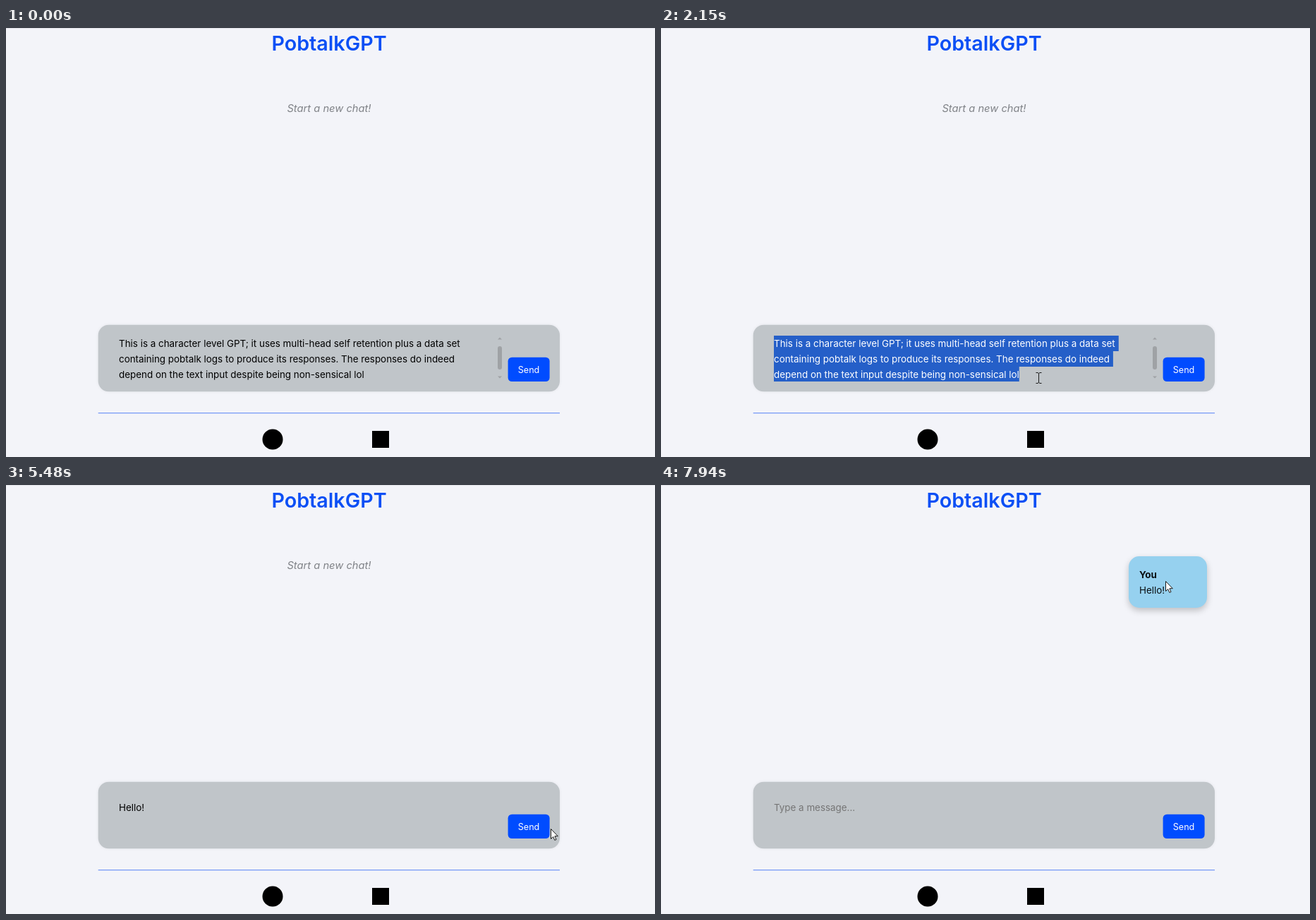
Animation, 920 px wide and 608 px high, one loop 8000 ms. Source, as an HTML page with a canvas:

```html
<!DOCTYPE html>
<html lang="en">
<head>
<meta charset="utf-8">
<title>PobtalkGPT</title>
<style>
  html, body { margin: 0; width: 100%; height: 100%; overflow: hidden; background: #f3f4f9; }
  canvas { display: block; width: 920px; height: 608px; }
</style>
</head>
<body>
<canvas id="stage" width="920" height="608"></canvas>
<script>
const ctx = document.getElementById('stage').getContext('2d');

const LOOP = 8000;
const ENTER = 190, FOCUS = 840, SELECT = 2150, CLEAR = 3280, TYPE = 3940, SEND = 5680, HOVER = 7400;
const KEY_GAP = 162, BLINK = 530;

const MESSAGE = 'Hello!';
const PARAGRAPH = [
  'This is a character level GPT; it uses multi-head self retention plus a data set',
  'containing pobtalk logs to produce its responses. The responses do indeed',
  'depend on the text input despite being non-sensical lol'
];
const BODY_SIZE = 13.4, LINE = 21.8, TEXT_X = 160;

const clamp01 = v => Math.max(0, Math.min(1, v));
const progress = (t, start, end) => clamp01((t - start) / (end - start));
const smooth = u => u * u * (3 - 2 * u);
const easeOut = u => 1 - (1 - u) ** 3;
const inside = (p, x0, y0, x1, y1) => p.x >= x0 && p.x <= x1 && p.y >= y0 && p.y <= y1;

function pointerAt(t) {
  const p = { x: 650, y: 545 };
  const glide = (start, end, x, y) => {
    const u = smooth(progress(t, start, end));
    p.x += (x - p.x) * u;
    p.y += (y - p.y) * u;
  };
  glide(ENTER, 560, 550, 474);      // into the text area and just below it
  glide(700, 940, 542, 502);
  glide(940, 1065, 468, 459);       // over the words and back
  glide(1210, 1950, 535, 496);
  glide(5080, 5350, 824, 491);      // past the button, then onto it
  glide(5350, 5560, 748, 485);
  glide(5890, 6440, 628, 294);      // up to the new message
  glide(6970, 7480, 732, 136);
  glide(7730, 7940, 715, 136);
  return p;
}

function setFont(size, style = '400') {
  ctx.font = `${style} ${size}px Inter, sans-serif`;
}

function text(str, x, y, size, color, style, align = 'left') {
  setFont(size, style);
  ctx.fillStyle = color;
  ctx.textAlign = align;
  ctx.fillText(str, x, y);
}

function widthOf(str) {
  setFont(BODY_SIZE);
  return ctx.measureText(str).width;
}

function box(x, y, w, h, r, color) {
  ctx.fillStyle = color;
  ctx.beginPath();
  ctx.roundRect(x, y, w, h, r);
  ctx.fill();
}

function withShadow(alpha, blur, dy, paint) {
  ctx.save();
  ctx.shadowColor = `rgba(0,0,0,${alpha})`;
  ctx.shadowBlur = blur;
  ctx.shadowOffsetY = dy;
  paint();
  ctx.restore();
}

function drawPage(hover) {
  box(0, 0, 920, 608, 0, '#f3f4f9');
  box(0, 0, 920, 1, 0, '#e3e5ea');
  text('PobtalkGPT', 458, 31.5, 28.7, '#0b4ff5', '600', 'center');
  withShadow(0.07, 4, 0, () => box(130.7, 420.7, 654.3, 94.6, 15, '#c0c5c9'));
  box(130.7, 545.2, 654.3, 1, 0, '#5580f6');
  box(711.6, 466.7, 59, 34.3, 5.5, hover ? '#2566ea' : '#004cff');
  text('Send', 741, 488.5, 12.6, '#fff', '400', 'center');
  box(363.5, 568.5, 29, 29, 14.5, '#000');
  box(519, 571, 24, 24, 0, '#000');
}

function drawScrollbar() {
  const gray = '#9fa2a5';
  box(697, 451, 6, 33, 3, gray);
  for (const dir of [-1, 1]) {
    const base = 467.5 + 26 * dir;
    ctx.beginPath();
    ctx.moveTo(697, base);
    ctx.lineTo(700, base + 3 * dir);
    ctx.lineTo(703, base);
    ctx.fill();
  }
}

function drawParagraph(selected) {
  PARAGRAPH.forEach((line, i) => {
    const last = i === PARAGRAPH.length - 1;
    if (selected) {
      box(TEXT_X, 436 + 22 * i, widthOf(line) + (last ? 0 : 5), last ? 21 : 22, 0, '#255fc8');
    }
    text(line, TEXT_X, 452.3 + LINE * i, BODY_SIZE, selected ? '#fff' : '#000');
  });
  drawScrollbar();
}

function drawCaret(t, since, content, y) {
  if (t >= since && (t - since) % (2 * BLINK) < BLINK) {
    box(Math.round(TEXT_X + widthOf(content)), y, 1.3, 19, 0, '#000');
  }
}

function drawInput(t) {
  if (t < CLEAR) {
    const selected = t >= SELECT;
    drawParagraph(selected);
    if (!selected) drawCaret(t, FOCUS, PARAGRAPH[2], 481);
    return;
  }
  const keys = Math.min(MESSAGE.length, Math.max(0, Math.floor((t - TYPE) / KEY_GAP) + 1));
  const typed = t < SEND ? MESSAGE.slice(0, keys) : '';
  text(typed || 'Type a message...', TEXT_X, 462, BODY_SIZE, typed ? '#000' : '#757575');
  const lastEdit = keys ? TYPE + (keys - 1) * KEY_GAP : CLEAR;
  if (t < SEND) drawCaret(t, lastEdit, typed, 447);
}

function drawChat(t) {
  if (t < SEND) {
    text('Start a new chat!', 458, 118.5, 14.7, '#808388', 'italic 400', 'center');
    return;
  }
  const scale = easeOut(progress(t, SEND, SEND + 220));
  const lift = progress(t, HOVER, HOVER + 250);
  ctx.save();
  ctx.translate(718.5, 137.5);
  ctx.scale(scale, scale);
  ctx.translate(-718.5, -137.5);
  withShadow(0.22 * lift, 10, 4, () => box(663, 101, 111, 73, 15, '#96d1ef'));
  text('You', 678, 131.5, BODY_SIZE, '#0a0f12', '700');
  text(MESSAGE, 678, 153.5, BODY_SIZE, '#0a0f12');
  ctx.restore();
}

const ARROW = new Path2D('M.5 .5V14.5L3.7 11.5L5.8 16.4L8 15.5L5.9 10.7H10.3Z');
const HAND = new Path2D('M-1.5 1Q0 -1 1.5 1V6.5Q3 5.3 4 7Q5.6 6 6.5 7.8Q8.7 7 8.7 9.5V13Q8.5 15 7.3 16.5V18H-.8V16.5L-5 11Q-5.5 8.5 -3.2 9.3L-1.5 11Z');
const BEAM = new Path2D('M-3.5 -7.5H-1L.5 -6.5L2 -7.5H4.5M.5 -6.5V6.5M-3.5 7.5H-1L.5 6.5L2 7.5H4.5');

function drawPointer(p, overButton) {
  const overText = inside(p, 146, 436, 704, 501);
  const shape = overButton ? HAND : overText ? BEAM : ARROW;
  ctx.save();
  ctx.translate(Math.round(p.x), Math.round(p.y));
  ctx.fillStyle = '#fff';
  ctx.strokeStyle = '#1a1a1a';
  ctx.lineWidth = 1;
  ctx.lineJoin = 'round';
  if (!overText) ctx.fill(shape);
  ctx.stroke(shape);
  ctx.restore();
}

function draw(t) {
  const pointer = pointerAt(t);
  const overButton = inside(pointer, 712, 467, 770, 501);
  drawPage(overButton);
  drawInput(t);
  drawChat(t);
  if (t >= ENTER) drawPointer(pointer, overButton);
}

const began = performance.now();
function tick() {
  draw((performance.now() - began) % LOOP);
  requestAnimationFrame(tick);
}
tick();
</script>
</body>
</html>
```
